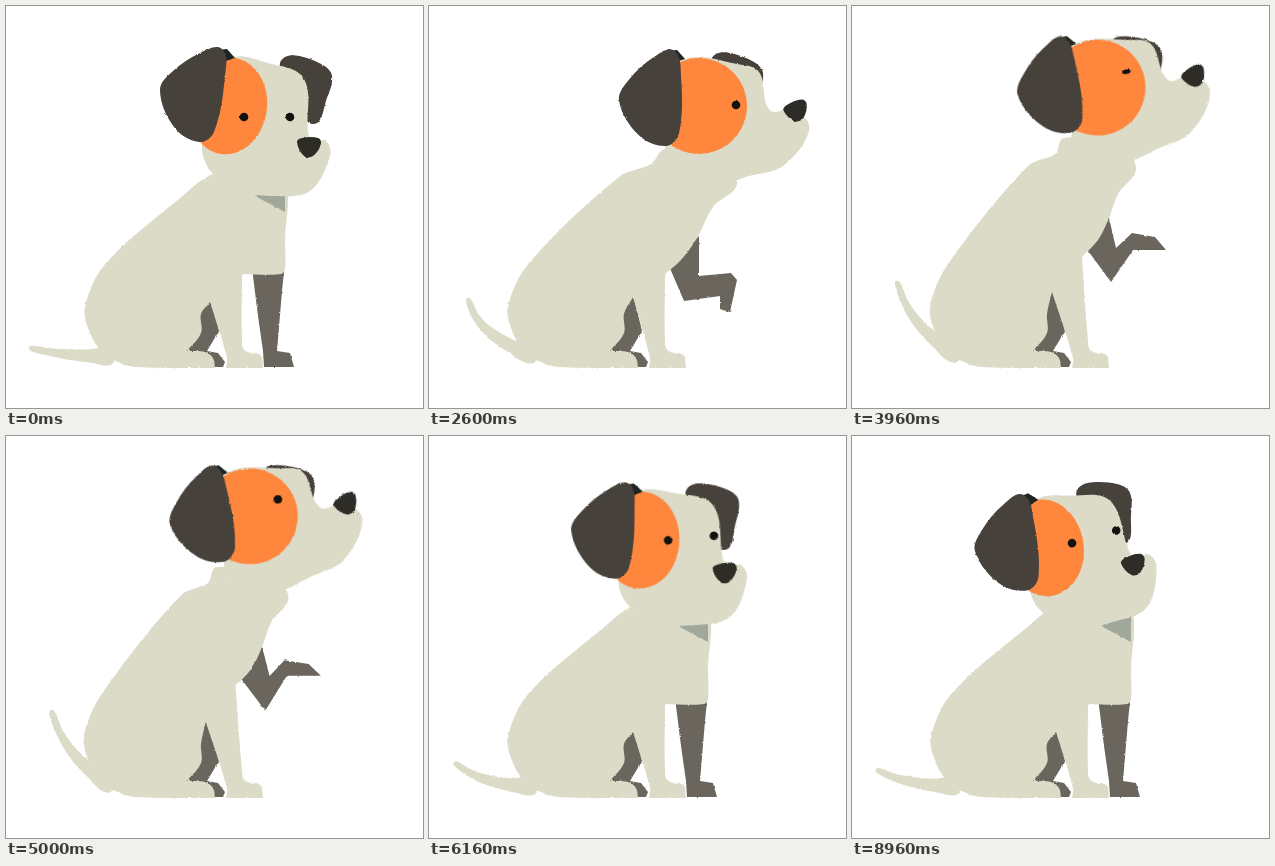
An HTML page for the animation above (9 s loop, 417 px wide and 402 px high).

```html
<!DOCTYPE html>
<html lang="en">
<head>
<meta charset="utf-8">
<title>Dog</title>
<style>
html, body { margin: 0; width: 100%; height: 100%; overflow: hidden; background: #fff; }
svg { display: block; width: 417px; height: 402px; }
</style>
</head>
<body>
<svg viewBox="0 0 417 402">
  <filter id="rough" filterUnits="userSpaceOnUse" x="0" y="0" width="417" height="402" color-interpolation-filters="sRGB">
    <feTurbulence type="fractalNoise" baseFrequency=".28" numOctaves="2" seed="4"/>
    <feDisplacementMap in="SourceGraphic" scale="2.2" xChannelSelector="R" yChannelSelector="G"/>
  </filter>
  <g id="dog" filter="url(#rough)"></g>
</svg>
<script>
const LOOP = 9000, STEP = 40, WAG = 800;
const LIGHT = '#dbdbc8', SHADE = '#6a665d', DARK = '#46413a', ORANGE = '#ff873d', BLACK = '#11110f';

const points = text => text.trim().split(/\s+/).map(pair => pair.split(',').map(Number));
const mix = (a, b, k) => a + (b - a) * k;
const mixPoints = (a, b, k) => a.map(([x, y], i) => [mix(x, b[i][0], k), mix(y, b[i][1], k)]);
const clamp = k => Math.min(1, Math.max(0, k));

// Eased value of a list of [time, value] keys.
function track(keys, t) {
  const i = keys.findIndex(key => key[0] > t);
  if (i === 0) return keys[0][1];
  if (i < 0) return keys[keys.length - 1][1];
  const [t0, a] = keys[i - 1], [t1, b] = keys[i];
  const k = (t - t0) / (t1 - t0);
  return mix(a, b, k * k * (3 - 2 * k));
}

// Outline turned about its centre, then shifted.
function moved(list, dx, dy, degrees = 0) {
  const [cx, cy] = [0, 1].map(axis => list.reduce((sum, p) => sum + p[axis], 0) / list.length);
  const cos = Math.cos(degrees * Math.PI / 180), sin = Math.sin(degrees * Math.PI / 180);
  return list.map(([x, y]) => [
    cx + dx + (x - cx) * cos - (y - cy) * sin,
    cy + dy + (x - cx) * sin + (y - cy) * cos
  ]);
}

const ring = (cx, cy, rx, ry) => Array.from({ length: 12 }, (_, i) =>
  [cx + rx * Math.cos(i * Math.PI / 6), cy + ry * Math.sin(i * Math.PI / 6)]);

// Closed curve through the points; a doubled point makes a corner.
function curve(list) {
  const n = list.length, at = i => list[(i + n) % n];
  const handle = (i, length) => {
    const dx = at(i + 1)[0] - at(i - 1)[0], dy = at(i + 1)[1] - at(i - 1)[1];
    const k = length * 0.34 / (Math.hypot(dx, dy) || 1);
    return [dx * k, dy * k];
  };
  let d = 'M' + list[0];
  for (let i = 0; i < n; i++) {
    const p = at(i), q = at(i + 1), length = Math.hypot(q[0] - p[0], q[1] - p[1]);
    const a = handle(i, length), b = handle(i + 1, length);
    d += `C${p[0] + a[0]},${p[1] + a[1]} ${q[0] - b[0]},${q[1] - b[1]} ${q}`;
  }
  return d + 'Z';
}
const polygon = list => 'M' + list.join('L') + 'Z';

function add(parent, tag, attributes = {}) {
  const node = parent.appendChild(document.createElementNS('http://www.w3.org/2000/svg', tag));
  return set(node, attributes);
}
function set(node, attributes) {
  for (const name in attributes) node.setAttribute(name, attributes[name]);
  return node;
}

const dog = document.getElementById('dog');
const parts = [];
function part(parent, fill, outline, sit, stretched = sit, raised = stretched, tilted = sit) {
  const node = add(parent, 'path', { fill });
  parts.push({ node, outline, sit, stretched, raised, tilted });
}

const tail = add(dog, 'path', { fill: LIGHT });
// Each tail shape is a bend and a tip.
const TAIL = { low: '60,351 24,342', high: '50,350 27,319', out: '40,336 15,298', stretched: '48,330 39,293', raised: '57,321 45,276' };
for (const name in TAIL) TAIL[name] = points(TAIL[name]);

// far hind leg
part(dog, SHADE, polygon, points('170,345 190,290 203,284 213,325 201,345 212,347 219,356 217,361 190,361'));

// far front leg
part(dog, SHADE, polygon,
  points('279,255 276,285 271,345 284,347 288,361 258,361 257,345 252,310 246,262'),
  points('270,230 270,270 302,267 308,274 301,306 291,303 291,290 255,295 240,260'),
  points('257,212 264,242 280,227 303,231 314,244 284,244 281,244 259,276 234,242'));

// body with near legs
const body = (back, crotch, chest) => points(`${back}
  95,345 112,356 130,361 209,362 209,362 207,352 199,346 181,345 181,345 195,327 195,308 ${crotch} ${crotch}
  221,352 220,362 220,362 257,362 257,362 254,349 239,345 236,335 ${chest}`);
part(dog, LIGHT, curve,
  body('207,168 196,174 180,187 100,257 79,300 82,322', '204,296',
    '236,268 236,268 275,268 279,262 279,235 279,170 250,150'),
  body('236,143 222,158 190,171 100,257 79,300 82,322', '204,291',
    '236,268 236,268 252,254 268,232 284,201 308,176 280,150'),
  body('212,132 203,148 176,160 98,255 79,295 80,318', '200,286',
    '230,251 230,251 246,234 257,212 266,188 284,161 260,140'));

// collar, tucked under the chin when stretching
part(dog, '#a0a79b', polygon, points('249,190 279,176 279,206'), ring(285, 160, 0, 0).slice(0, 3), ring(262, 140, 0, 0).slice(0, 3));

const head = add(dog, 'g');

const farEar = points('274,60 279,51 293,50 317,59 326,70 321,92 307,118 290,90');
const farEarStretched = moved(farEar, 8, -3);
part(head, DARK, curve, farEar, farEarStretched, moved(farEarStretched, 5, 7), moved(farEar, -7, 0));

// skull and muzzle
part(head, LIGHT, curve,
  points('196,143 206,80 224,52 262,57 298,73 304,133 320,135 324,150 304,185 270,190 232,185 207,168'),
  points('236,143 240,80 256,53 308,58 330,66 341,104 366,103 380,124 354,160 324,169 275,180 240,165'));

// patch
part(head, ORANGE, curve, moved(ring(222, 100, 39, 48.5), 0, 0, 8), ring(270, 100, 48, 48));

// inside of near ear
const innerEar = points('212,44 221,43 229,52 214,57');
part(head, '#1d2523', polygon, innerEar, moved(innerEar, 27, 1));

const nearEar = points('216,43 219,70 208,126 193,136 168,121 154,84 167,65 194,47');
part(head, DARK, curve, nearEar, moved(nearEar, 36, 5, -9));

const nose = points('291,136 296,132 312,132 315,138 307,150 298,150');
part(head, '#2e2c26', curve, nose, moved(nose, 64, -36, -20));

const eyes = [0, 1].map(() => add(head, 'ellipse', { fill: BLACK }));
const EYES = {
  sit: points('238,111 284,111'), tilted: points('238,111 284,111'),
  stretched: points('307,99 345,95'), raised: points('301,89 345,95')
};

const TILT = [[80, 0], [900, .02], [1360, .27], [1800, .35], [6160, .35], [8320, 1]];
const STRETCH = [[1960, 0], [2320, 1.22], [2600, 1], [5540, 1], [5840, -.04], [6040, 0]];
const LIFT = [[2600, 0], [2840, 1], [2960, 1.2], [3240, 1], [3960, 1], [5000, 1.07], [5360, 1.2], [5560, 0]];
const GAZE = [[900, 0], [1360, .4], [1900, 1]];
const BLINK = [[3800, 1], [3880, .1], [3920, .1], [4000, 1]];

// Tapered tail along a quadratic curve.
function tailOutline([bend, tip]) {
  const base = [106, 350], near = [], far = [];
  for (let k = 0; k <= 1; k += .25) {
    const from = mixPoints([base], [bend], k)[0], to = mixPoints([bend], [tip], k)[0];
    const [x, y] = mixPoints([from], [to], k)[0];
    const angle = Math.atan2(to[1] - from[1], to[0] - from[0]), half = mix(8, 2.3, k);
    const dx = Math.sin(angle) * half, dy = Math.cos(angle) * half;
    near.push([x - dx, y + dy]);
    far.unshift([x + dx, y - dy]);
  }
  return curve([...near, ...far]);
}

function draw(t) {
  const tilt = track(TILT, t), stretch = track(STRETCH, t), lift = track(LIFT, t);
  const blend = pose => mixPoints(
    mixPoints(pose.sit, pose.tilted, tilt), mixPoints(pose.stretched, pose.raised, lift), stretch);
  for (const item of parts) set(item.node, { d: item.outline(blend(item)) });

  const turn = (sit, stretched) => mix(sit * tilt, stretched * lift, stretch);
  set(head, {
    transform: `translate(${turn(-25, -23)} ${turn(2, -21)})
      rotate(${turn(-16, -9.5)} ${mix(255, 285, stretch)} ${mix(120, 110, stretch)})`
  });

  const wag = lag => Math.cos(2 * Math.PI * (t / WAG - lag));
  const calm = mixPoints(TAIL.high, TAIL.low, (wag(0) + 1) / 2);
  const curled = mixPoints(TAIL.stretched, TAIL.raised, lift);
  const excited = mixPoints(TAIL.out, curled, (wag(.1) + 1) / 1.59);
  set(tail, { d: tailOutline(mixPoints(calm, excited, clamp(stretch))) });

  const gaze = track(GAZE, t) * clamp(1 - stretch);
  const radii = [4.3, 4.3 * clamp(1 - stretch * 1.5)];
  blend(EYES).forEach(([x, y], i) => set(eyes[i], {
    cx: x + 11.5 * gaze, cy: y - 8 * gaze, rx: radii[i], ry: radii[i] * track(BLINK, t)
  }));
}

const start = performance.now();
function tick() {
  draw(Math.floor((performance.now() - start) % LOOP / STEP) * STEP);
  requestAnimationFrame(tick);
}
tick();
</script>
</body>
</html>
```
